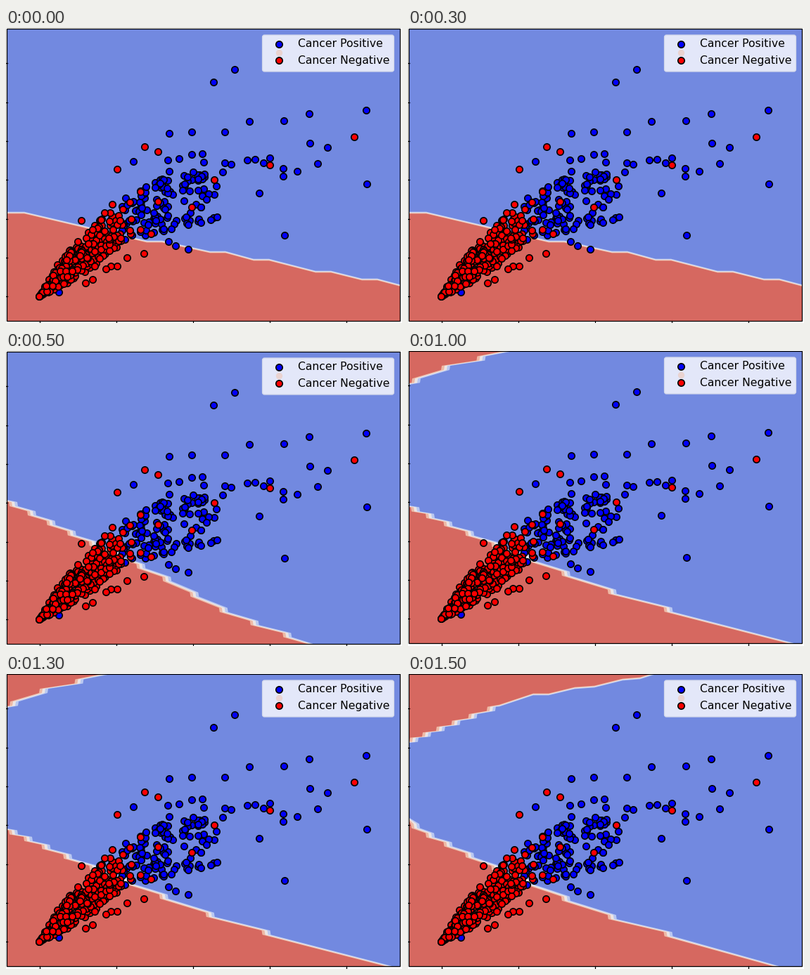
These frames come from a looping animation (563x420 px, 2000 ms). A matplotlib script:

```python
import numpy as np
import matplotlib.pyplot as plt
from matplotlib.animation import FuncAnimation
from matplotlib.patches import FancyBboxPatch, Polygon, Rectangle

W, H, DPI = 563, 420, 100
LEFT, TOP, RIGHT, BOTTOM = 1, 1, 560.3, 417
BLUE, RED = "#7289e0", "#d66860"
# Contour bands from the red side to the blue side
BANDS = [RED, "#eeb9a5", "#ece5e4", "#b9c8f2"]
BAND_SHIFT, BAND_LIFT, JUMP = 4, 0.9, 6

rng = np.random.default_rng(11)
fig = plt.figure(figsize=(W / DPI, H / DPI), dpi=DPI, facecolor="white")
ax = fig.add_axes([0, 0, 1, 1])
ax.set_xlim(0, W)
ax.axis("off")

field = ax.add_patch(Rectangle((LEFT, TOP), RIGHT - LEFT, BOTTOM - TOP,
                               fc=BLUE, ec="none", zorder=0))


def spread(start, gap, growth, count):
    """Step positions whose gaps grow by a constant factor."""
    return start + gap * (growth ** np.arange(count) - 1) / (growth - 1)


def boundary(keys, steps, band, side):
    """Line through the keys, broken into jumps at the step positions."""
    kx, ky = np.array(keys).T
    lift = side * (1.5 - band) * BAND_LIFT
    shift = (band - 1.5) * BAND_SHIFT
    pts = [(kx[0], ky[0] + lift)]
    for x in steps:
        y = np.interp(x, kx, ky) + lift + side * shift * 0.22
        pts += [(x + shift, y - side * JUMP / 2),
                (x + shift + 1, y + side * JUMP / 2)]
    last = steps[-1] if len(steps) else kx[0]
    return pts + [(x, y + lift) for x, y in keys if x > last + 10]


def region(keys, steps=(), side=1):
    """Red area below (side 1) or above (side -1) a boundary."""
    edge = BOTTOM + 5 if side > 0 else TOP - 5
    patches = []
    for band in reversed(range(len(BANDS))):
        pts = boundary(keys, steps, band, side)
        pts += [(pts[-1][0], edge), (0, edge)]
        patch = ax.add_patch(Polygon(pts, fc=BANDS[band], ec="none", zorder=1))
        patch.set_clip_path(field)
        patches.append(patch)
    return patches


plateaus = [(4, 263), (200, 304), (290, 319), (352, 330), (440, 347), (506, 358)]
smooth = [(x + dx, y) for x, y in plateaus for dx in (0, 22)]
smooth = [(0, 263)] + smooth + [(562, 367)]
steep = [(0, 213), (96, 261), (220, 320), (298, 364), (344, 384), (436, 418)]
wide = [(0, 222), (110, 271), (275, 339), (365, 368), (548, 418)]
bent = [(0, 206), (14, 222), (115, 273), (270, 341), (365, 370), (527, 418)]
corner = [(0, 48), (53, 25), (143, 1), (150, -1)]
roof = [(0, 98), (41, 81), (117, 51), (130, 46), (178, 30), (200, 30),
        (237, 21), (265, 19), (305, 9), (330, 7), (352, 0)]
coarse = spread(10, 21, 1.21, 9)

# Each scene: vertical lift of the whole plot, then its red areas
scenes = [
    (0, region(smooth)),
    (0, region(steep, spread(10, 26, 1.06, 12))),
    (1, region(wide, coarse) + region(corner, spread(11, 42, 1.2, 3), -1)),
    (1, region(bent, coarse) + region(roof, spread(8, 18, 1.1, 6), -1)),
]


def dots(points, color, zorder):
    x, y = np.array(points).T
    ax.scatter(x, y, s=45, c=color, edgecolors="black", linewidths=1.25,
               zorder=zorder)


# Broad blue cloud, rising to the right and thinning out
s = rng.beta(1.3, 1.9, 125)
cloud = np.column_stack([
    163 + 165 * s, 282 - 50 * np.sqrt(s) + rng.uniform(-38, 38, s.size)])

# Dense red fan opening from the lower left
t = 1.05 * rng.beta(1.3, 1.5, 330)
across = 25 * np.minimum(1, 2 * t) * (2 * rng.beta(1.5, 1.5, t.size) - 1)
fan = np.column_stack([47 + 115 * t + 0.67 * across,
                       382 - 105 * t + 0.74 * across])

far_blue = [(325, 59), (295, 77), (512, 116.5), (431, 122), (395, 132),
            (346, 133), (232, 150), (264, 148), (311, 148), (432, 163.5),
            (457, 169.5), (443, 193), (181, 189.5), (230, 188), (246, 186),
            (264, 180), (279, 179), (281, 191), (311, 192), (320, 194),
            (343, 188), (354, 187), (366, 192), (375, 185), (394, 200),
            (394, 211), (414, 204), (513, 222), (360, 234.5), (396, 294.5),
            (232, 204), (259, 315), (241, 310), (231, 304), (75, 376)]
far_red = [(495, 155), (197, 168.5), (216, 176), (158, 201), (375, 195),
           (296, 216), (264, 255), (216, 247), (191, 233), (176, 248),
           (166, 257.5), (151, 251), (140, 263), (178, 272), (191, 287),
           (206, 293), (196, 321), (172, 327), (158, 339), (149, 339),
           (142, 343), (123, 358), (113, 363), (107, 274), (47, 382)]

dots(np.vstack([cloud, far_blue]), "blue", 3)
dots(np.vstack([fan, far_red]), "red", 4)

# Frame and ticks
ax.add_patch(Rectangle((LEFT, TOP), RIGHT - LEFT, BOTTOM - TOP, fc="none",
                       ec="black", lw=0.9, zorder=6))
for x in 47.5 + 109.2 * np.arange(5):
    ax.plot([x, x], [BOTTOM, H + 1], color="black", lw=0.9, zorder=6)
for y in 50.3 + 55.3 * np.arange(7):
    ax.plot([0, 1.5], [y, y], color="black", lw=0.9, zorder=6)

# Legend, with one dot showing faintly through it
ax.add_patch(FancyBboxPatch((364.5, 10), 187, 52,
                            boxstyle="round,pad=0,rounding_size=3",
                            fc="#e3e7f9", ec="#d3d8ea", lw=0.9, zorder=7))
ax.scatter([388.5], [35.5], s=45, c="#ead3d0", edgecolors="none", zorder=8)
for label, color, y in (("Cancer Positive", "blue", 22.5),
                        ("Cancer Negative", "red", 46.2)):
    dots([(387.5, y)], color, 9)
    ax.text(415.2, y + 4.6, label, family="DejaVu Sans", size=11.24,
            color="black", va="baseline", zorder=9)


def show(i):
    for n, (lift, patches) in enumerate(scenes):
        for patch in patches:
            patch.set_visible(n == i)
    lift = scenes[i][0]
    ax.set_ylim(H + lift, lift)
    return []


anim = FuncAnimation(fig, show, frames=len(scenes), interval=500,
                     init_func=lambda: show(0), repeat=True, repeat_delay=0)
plt.show()
```
